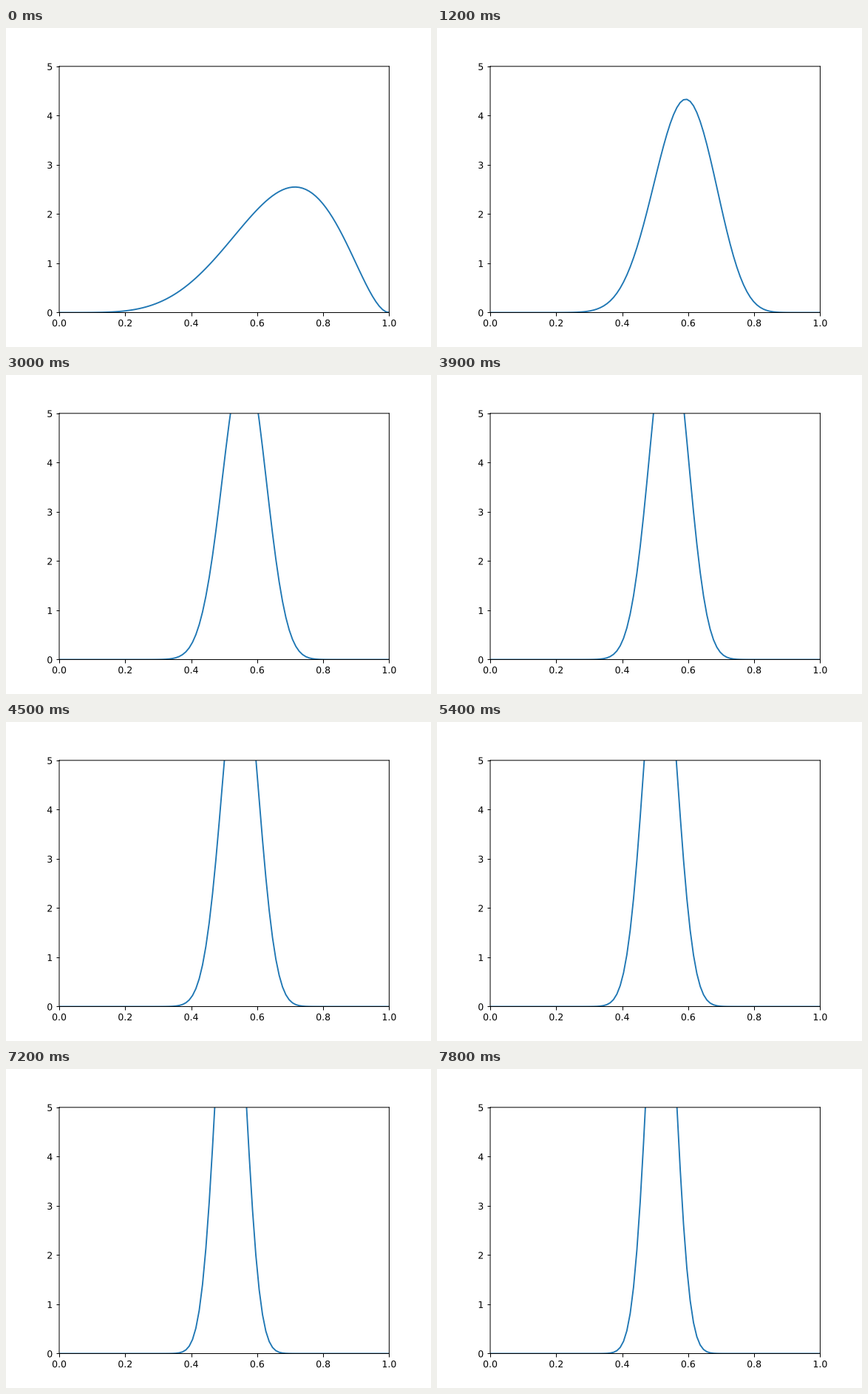
These frames come from a looping animation (575x431 px, 8000 ms). A matplotlib script:

```python
from itertools import accumulate
from math import comb

import matplotlib.pyplot as plt
import numpy as np
from matplotlib.animation import FuncAnimation
from matplotlib.patheffects import Normal

WIDTH, HEIGHT, DPI = 575, 431, 90
PAGE_W, PAGE_H = 6.4 * DPI, 4.8 * DPI  # the page is cropped at right and bottom
TICK_MS = 100
TICKS_PER_UPDATE = 3
LOOP_TICKS = 80

# Coin flips: 7 to begin with, then 5 more per update.
FIRST_FLIPS, FLIPS_PER_UPDATE = 7, 5
FIRST_HEADS = 5
NEW_HEADS = [3, 3, 2, 3, 3, 2, 3, 3, 2, 3, 2, 3, 2,
             3, 3, 4, 1, 0, 3, 3, 3, 3, 3, 1, 2, 3]
HEADS = list(accumulate(NEW_HEADS, initial=FIRST_HEADS))

# Smooth vector look: nothing snaps to pixels, and labels and ticks are paths.
plt.rcParams.update({"path.snap": False, "path.effects": [Normal()],
                     "text.hinting": "none"})

x = np.linspace(0, 1, 100)


def posterior(flips, heads):
    """Beta density of the coin's bias under a uniform prior."""
    scale = (flips + 1) * comb(flips, heads)
    return scale * x**heads * (1 - x)**(flips - heads)


eps = 1e-6  # keeps the pixel size from rounding down
fig = plt.figure(figsize=((WIDTH + eps) / DPI, (HEIGHT + eps) / DPI), dpi=DPI)
ax = fig.add_axes([0.125 * PAGE_W / WIDTH, 1 - 0.89 * PAGE_H / HEIGHT,
                   0.775 * PAGE_W / WIDTH, 0.77 * PAGE_H / HEIGHT])
ax.set(xlim=(0, 1), ylim=(0, 5))
line, = ax.plot([], [], color="C0", lw=1.5)


def update(tick):
    step = tick // TICKS_PER_UPDATE
    flips = FIRST_FLIPS + FLIPS_PER_UPDATE * step
    line.set_data(x, posterior(flips, HEADS[step]))
    return line,


anim = FuncAnimation(fig, update, frames=LOOP_TICKS, interval=TICK_MS,
                     init_func=lambda: update(0), repeat=True, repeat_delay=0)
plt.show()
```
